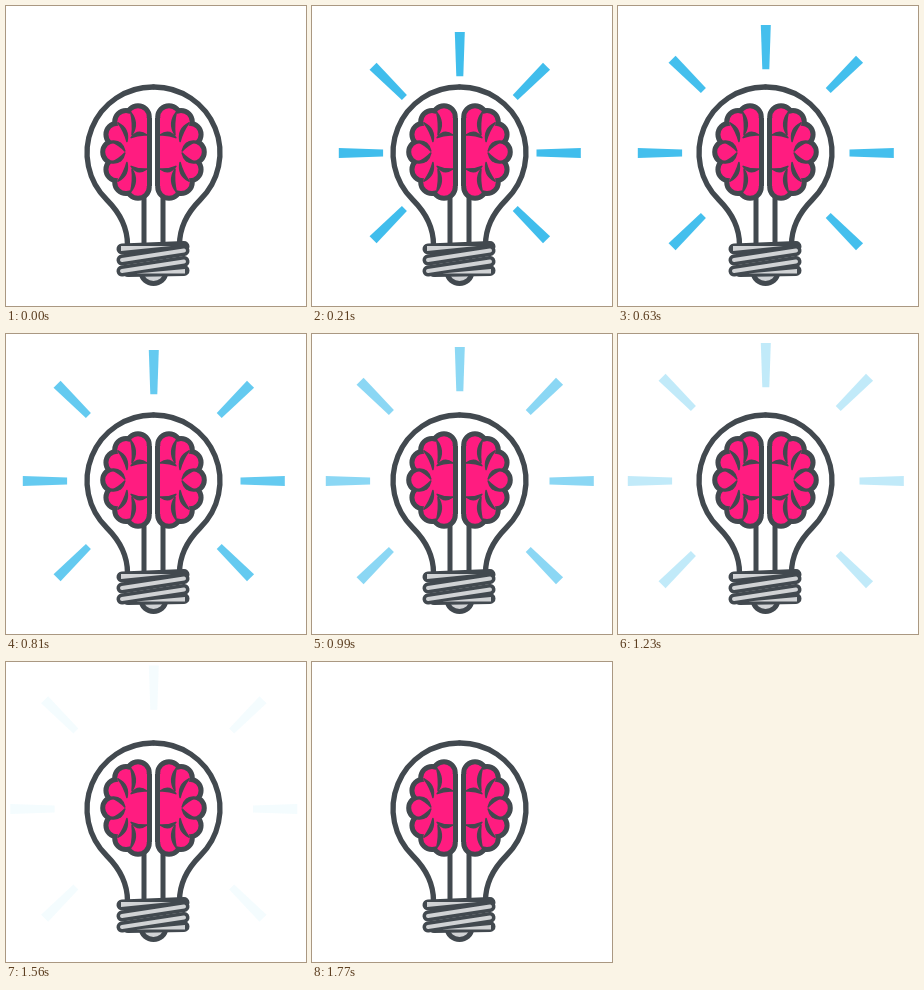
Recreate the animation shown at these times as an HTML page with a canvas. Size 300x300 px, loop 2.19 s.

```html
<!DOCTYPE html>
<html>
<head>
<meta charset="utf-8">
<title>Bright idea</title>
<style>
html, body { margin: 0; width: 100%; height: 100%; overflow: hidden; background: #fff; }
canvas { display: block; width: 300px; height: 300px; }
</style>
</head>
<body>
<canvas id="stage" width="300" height="300"></canvas>
<script>
const ctx = document.getElementById('stage').getContext('2d');
const LOOP = 2190, STEP = 30, FADE_IN = 270, END = 1770;
const DARK = '#42494f', PINK = '#ff1c80', GREY = '#d1d3d5', BLUE = '#27b5ea';
const TAU = Math.PI * 2, AXIS = 147.5;

function stroke(path, color, width) {
  ctx.strokeStyle = color;
  ctx.lineWidth = width;
  ctx.stroke(path);
}

function fill(path, color) {
  ctx.fillStyle = color;
  ctx.fill(path);
}

function mirrored(draw) {
  draw();
  ctx.save();
  ctx.translate(2 * AXIS, 0);
  ctx.scale(-1, 1);
  draw();
  ctx.restore();
}

// Point on the left half of the brain's ellipse; a runs from -90 (top) to 90 degrees.
function onBrain(a, scale = 1) {
  const r = a * Math.PI / 180;
  return [132 - 24 * scale * Math.cos(r), 146 + 35 * scale * Math.sin(r)];
}

function lobes(grow) {
  const p = new Path2D();
  for (let a = -90; a <= 90; a += 30) {
    const [x, y] = onBrain(a), r = 11.3 + grow;
    p.moveTo(x + r, y);
    p.arc(x, y, r, 0, TAU);
  }
  p.rect(115, 112, 28.5 + grow, 68);
  return p;
}

// Tapered hook from one point to another, bulging sideways by bend.
function hook([x1, y1], [x2, y2], bend) {
  const len = Math.hypot(x2 - x1, y2 - y1);
  const nx = (y1 - y2) / len, ny = (x2 - x1) / len;
  const mx = (x1 + x2) / 2, my = (y1 + y2) / 2;
  const p = new Path2D();
  p.moveTo(x1, y1);
  p.quadraticCurveTo(mx + nx * (bend + 3), my + ny * (bend + 3), x2, y2);
  p.quadraticCurveTo(mx + nx * (bend - 3), my + ny * (bend - 3), x1, y1);
  fill(p, DARK);
  stroke(p, DARK, 1.5);
}

function halfBrain() {
  stroke(new Path2D('M138 188V239'), DARK, 5);
  fill(lobes(2.5), DARK);
  fill(lobes(-2.5), PINK);
  for (let a = -75; a <= 75; a += 30) {
    const turn = a < 0 ? 1 : -1;
    hook(onBrain(a, 1.18), onBrain(a + 12 * turn, 0.55), -5 * turn);
  }
  for (const side of [-1, 1]) {
    hook(onBrain(side * 55, 0.5), [141, 146 + side * 17], side * 5);
  }
}

function brain() {
  mirrored(halfBrain);
}

function glass() {
  const half = new Path2D(
    'M147 81 A65.8 65.8 0 0 0 101 194 C113 206 121.5 220 121.5 239');
  mirrored(() => stroke(half, DARK, 5.3));
}

function base() {
  const nub = new Path2D();
  nub.ellipse(147.5, 267, 12, 10.5, 0, 0, Math.PI);
  fill(nub, GREY);
  stroke(nub, DARK, 5);
  const threads = [0, 1, 2].map(i =>
    new Path2D(`M116 ${243 + 11 * i}L178 ${240.5 + 11 * i - (i ? 7 : 0)}`));
  threads.push(new Path2D('M122 265.5L178 264.5'));
  threads.forEach(p => stroke(p, DARK, 11));
  fill(new Path2D('M115 240H165L115 245Z M179 263V267.5H130Z'), GREY);
  threads.slice(1, 3).forEach(p => stroke(p, GREY, 4));
}

const ease = p => (1 - Math.cos(Math.PI * p)) / 2;

function glow(t) {
  if (t >= END) return 0;
  return t < FADE_IN ? ease(t / FADE_IN) : 1 - ease((t - FADE_IN) / (END - FADE_IN));
}

// Seven rays, one every 45 degrees, with none below the bulb.
function rays(t) {
  const shift = (t - 210) / 60;
  ctx.fillStyle = BLUE;
  for (let k = 0; k < 7; k++) {
    const pace = k % 2 ? 1 : Math.SQRT2;
    const far = 117 + pace * (4 + shift), near = far - 44.3;
    ctx.save();
    ctx.translate(147.8, 147);
    ctx.rotate((k + 3) * TAU / 8);
    ctx.beginPath();
    ctx.moveTo(far, -5);
    ctx.lineTo(near, -3.5);
    ctx.lineTo(near, 3.5);
    ctx.lineTo(far, 5);
    ctx.fill();
    ctx.restore();
  }
}

function frame(now) {
  const t = Math.floor((now % LOOP) / STEP) * STEP;
  ctx.fillStyle = '#fff';
  ctx.fillRect(0, 0, 300, 300);
  ctx.lineCap = ctx.lineJoin = 'round';
  ctx.globalAlpha = glow(t);
  rays(t);
  ctx.globalAlpha = 1;
  glass();
  brain();
  base();
}

const start = performance.now();
function tick() {
  frame(performance.now() - start);
  requestAnimationFrame(tick);
}
tick();
</script>
</body>
</html>
```
